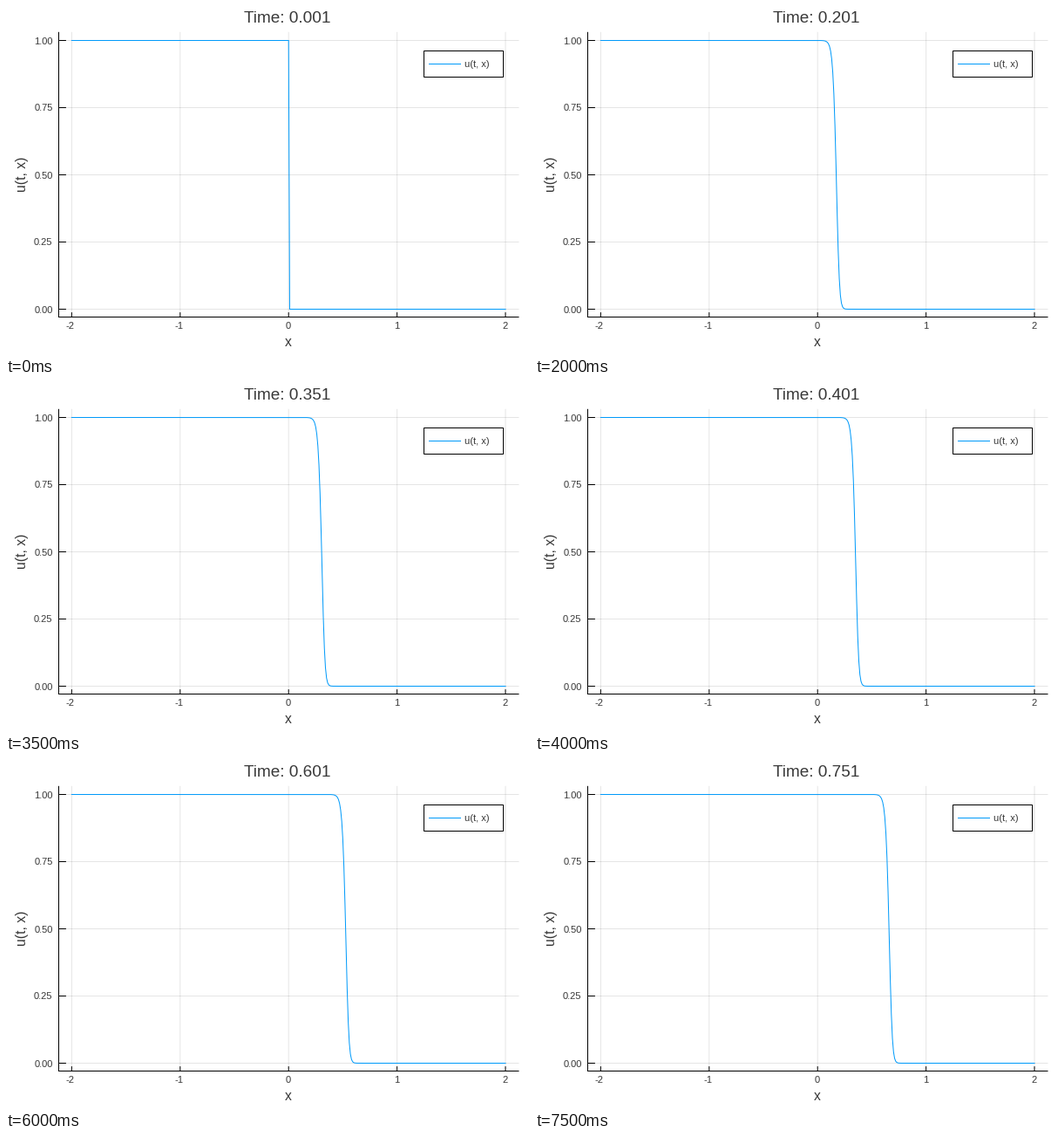
Write a matplotlib script that moves like this. It is 600x400 px and loops after 8 s.

```python
import numpy as np
import matplotlib.pyplot as plt
from matplotlib.animation import FuncAnimation
from matplotlib.patches import Rectangle

W, H, DPI = 600, 400, 100
PX = 72 / DPI  # points per pixel
FRAMES, INTERVAL = 16, 500
LEFT, RIGHT, TOP, BOTTOM = 60.5, 588, 30.3, 356.5
BLUE, INK = "#009afa", "#383838"

plt.rcParams["font.family"] = "Liberation Sans"
plt.rcParams["path.snap"] = False
fig = plt.figure(figsize=(W / DPI, H / DPI), dpi=DPI, facecolor="white")
ax = fig.add_axes([0, 0, 1, 1])
ax.set_xlim(0, W)
ax.set_ylim(H, 0)
ax.axis("off")


def sx(x):
    return 324.2 + 124.4 * x


def sy(u):
    return 347.5 - 308 * u


def line(xs, ys, color="black", width=1.0, **kw):
    return ax.plot(xs, ys, color=color, lw=width * PX, **kw)[0]


def label(x, y, s, size, ha="center", **kw):
    kw.setdefault("va", "baseline")
    return ax.text(x, y, s, size=size * PX, ha=ha, color=INK, **kw)


def wave(x, t):
    """Skewed travelling front that starts as a step and relaxes to its width."""
    p = 0.6
    mid = 0.885 * t - 0.006 + 0.011 * np.exp(-t / 0.02)
    width = 0.0173 * (1 - np.exp(-t / 0.05))
    z = (x - mid) / width + np.log(0.5 ** -p - 1)
    return np.exp(-np.logaddexp(0, z) / p)


# Grid, ticks and tick labels
tick_w = 0.015 * (RIGHT - LEFT)
tick_h = 0.015 * (BOTTOM - TOP)
for v in range(-2, 3):
    x = sx(v)
    line([x, x], [TOP, BOTTOM], alpha=0.1, zorder=1)
    line([x, x], [BOTTOM, BOTTOM - tick_h], zorder=2)
    label(x - (1.5 if v < 0 else 0.7), 370, str(v), 11.1)
for v in np.linspace(0, 1, 5):
    y = sy(v)
    line([LEFT, RIGHT], [y, y], alpha=0.1, zorder=1)
    line([LEFT, LEFT + tick_w], [y, y], zorder=2)
    label(53.6, y + 4, f"{v:.2f}", 11.1, ha="right")

# Axis lines and names
line([LEFT, LEFT], [TOP, BOTTOM], zorder=2)
line([LEFT, RIGHT], [BOTTOM, BOTTOM], zorder=2)
label(324, 390, "x", 15.6)
label(25.5, 193, "u(t, x)", 15.8, ha="right", va="center", rotation=90)

# Legend
ax.add_patch(Rectangle((479.5, 51.5), 91, 30, fc="white", ec="black",
                       lw=PX, zorder=4))
line([485.5, 521.5], [66.5, 66.5], BLUE, zorder=5)
label(526, 70.5, "u(t, x)", 11.1, ha="left", zorder=5)

grid = np.linspace(-2, 2, 401)
curve = line(sx(grid), sy(0 * grid), BLUE, zorder=3)
title = label(322.7, 19, "", 19)


def draw(i):
    t = 0.001 + 0.05 * i
    curve.set_ydata(sy(wave(grid, t)))
    title.set_text(f"Time: {t:.3f}")
    return curve, title


anim = FuncAnimation(fig, draw, frames=FRAMES, interval=INTERVAL,
                     repeat=True, repeat_delay=0)
plt.show()
```
